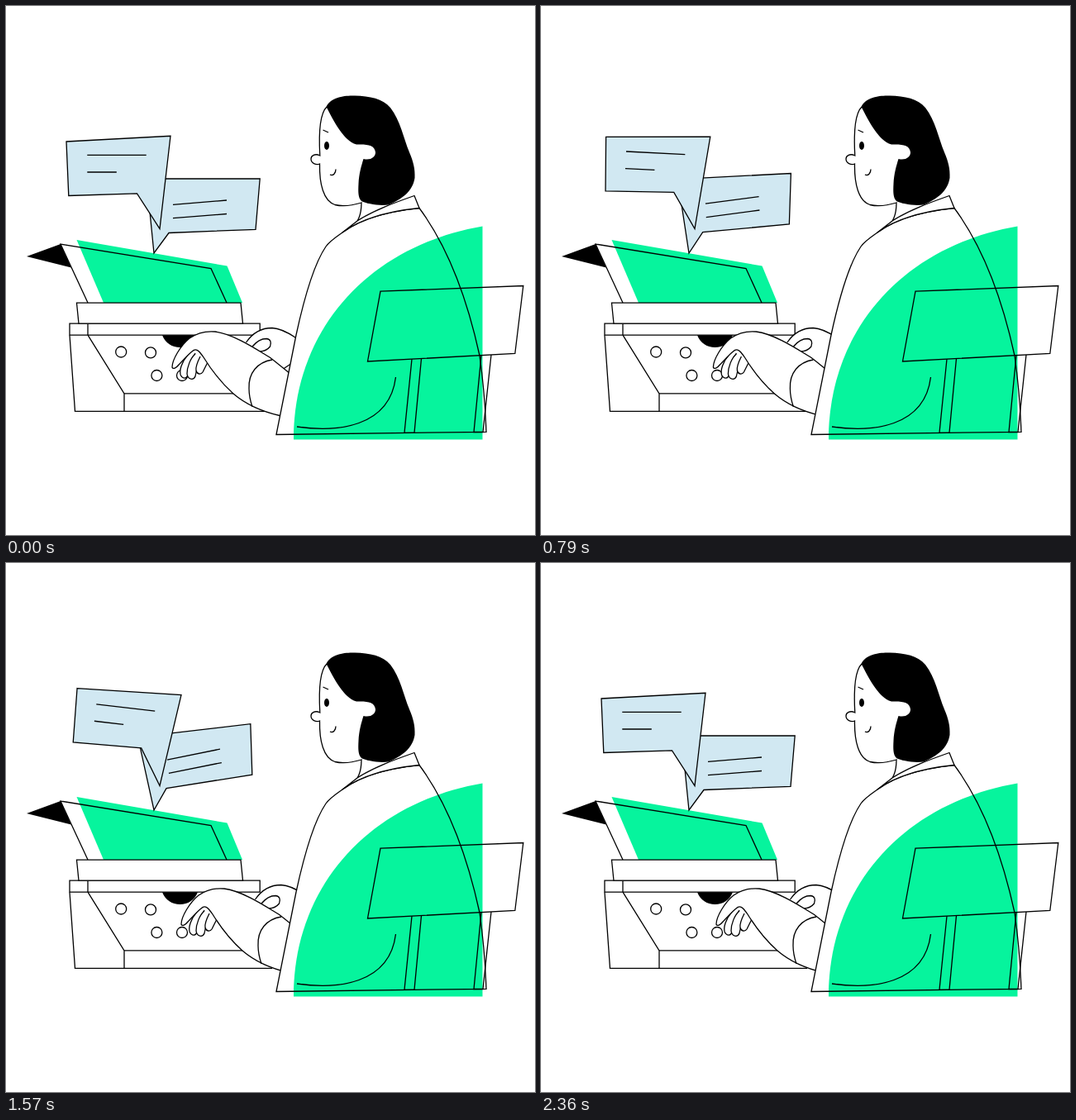
Animation of 640x640 px, one loop 2.43 s. Source, as an HTML page:

```html
<!DOCTYPE html>
<html lang="en">
<head>
<meta charset="utf-8">
<title>Typing woman</title>
<style>
  html, body { margin: 0; width: 100%; height: 100%; overflow: hidden; background: #fff; }
  svg { display: block; width: 100vw; height: 100vh; }
  .line { fill: none; stroke: #000; stroke-width: 1.3; }
  .white { fill: #fff; }
  .green { fill: #06f49d; stroke: none; }
  .blue { fill: #d1e8f2; }
  .solid { fill: #000; stroke: none; }
</style>
</head>
<body>
<svg viewBox="0 0 640 640">
  <g class="line" id="typewriter">
    <path d="M322 490.300H83.500L77 398.200"/>
    <path d="M99 398.200L143 469V490.300M143 468.800H300"/>
    <path d="M77 384.200H307.200V398.200H77ZM99 384.200V398.200"/>
    <path class="solid" d="M189 398.200C193 408 201 413 210.500 413S228 408 232 398.200Z"/>
    <circle cx="139.200" cy="418.500" r="6.500"/>
    <circle cx="175" cy="419.400" r="6.500"/>
    <circle cx="182.400" cy="447" r="6.500"/>
    <circle cx="213" cy="447" r="6.500"/>
    <path class="green" d="M85.500 283L267.500 314.500L286 359H118Z"/>
    <path d="M99 359L66 288L248 317.500L267 359"/>
    <path class="white" d="M85.500 359.200H284L286.500 384.200H88Z"/>
    <path class="solid" d="M25 303L66 288L79 316.500Z"/>
  </g>

  <g class="line" id="hands">
    <path class="white" d="M301.500 407C309 396 320 389.500 333 389.500C343 390 352 395 361 401L375 420L345 440L309 412"/>
    <path class="white" d="M309 412C314 406 320 402.500 326 402.500C331 403 332.500 407 330.500 412C327 416.500 323 418 317 418"/>
    <path class="white" d="M231 422C224 430 220 441 222.500 447C225 451.500 230 451 231 446C231 438 235 428 240 420"/>
    <path class="white" d="M240 421C234 426 230 437 230 445C231 452.500 238 453 240 448C241 442 243 435 247 429"/>
    <path class="white" d="M246 424C243 430 240 437 241 441C242 446 247 446 249 443C251 439 253 435 255 431"/>
    <path class="white" d="M212 437C212 428 222 411 233 402C243 395 253 393 264 394C287 397 315 416 330 425C338 431 345 437 356 446L366 500L342 495.500C318 490 300 481 286 469C268 453 258 438 250 425C248 422 247 421 245 418.500C242 415 239 415 236 418C230 423 224 430 220 434C217 438 213 440 212 437Z"/>
    <path d="M333 428C315 431 304 444 305 463C305 472 307 479 309 485"/>
  </g>

  <g class="line" id="person">
    <path class="white" stroke="none" d="M327 518.500L351 398L407 274L500 244.500L581 515.300Z"/>
    <path class="green" d="M348 524.500V516C352 384 445 289 576.500 266.500V524.500Z"/>
    <path d="M327 518.500L351 398C361 352 374 310 387 291C392 284 400 279 407 274C430 257 465 248 500 244.500C530 285 556 345 573 423C578 458 580 488 581 515.300Z"/>
    <path d="M352 509C400 516 464 510 471.500 449"/>
    <path class="white" d="M430 237C430 248 429 254 425 260L407 274C430 257 465 248 500 244.500L494 229.500C470 238 445 247 425 260"/>
    <path class="white" d="M388 122C380 130 378 150 379.800 181C374 178 369 181 369 185C369 190 375 193 379.500 191C379 215 384 236 398 240.500C408 243 420 241 430 238"/>
    <path class="solid" d="M387.500 122C393 110 410 108 422 108.500C440 109 456 112 465 123C477 138 481 160 488 177C493 189 495 197 494.500 208C492 225 478 234 463 240.500C450 242 436 239 430 236C426 232 426 225 426.500 215C427 203 430 193 432.500 185C441 187 447 183 447 177C446 168 437 167 424 167.500C408 163 396 138 387.500 122Z"/>
    <path d="M383.500 150L390 153M392 204C396 206 399 202 399 197.500"/>
    <ellipse id="eye" class="solid" cx="388" cy="169" rx="3" ry="5"/>
  </g>

  <g class="line" id="chair">
    <path d="M453 345.200L625.800 338.500L615.800 420.500L437.500 430Z"/>
    <path d="M491 427.200L482 516.300H494L502.500 426.600M575 422.800L566 515.500H577L587 422"/>
  </g>

  <g class="line" id="reply">
    <path class="blue" d="M170 209H307.200L302 270.300L197 274.500L179 299Z"/>
    <path d="M202 240.300L267 235M202 256.700L267 251.500"/>
  </g>
  <g class="line" id="message">
    <path class="blue" d="M73 164L199 157.300L186 269.500L158.500 226.800L75.800 229.500Z"/>
    <path d="M98.300 180.400H169.700M98.300 201H133.800"/>
  </g>
</svg>
<script>
const LOOP = 2430, STEPS = 34, STEP = LOOP / STEPS;
const $ = id => document.getElementById(id);

// [time in ms, value]
const SWAY = [[0, 0], [500, 1.05], [790, 3], [1000, 5.6], [1145, 8.2], [1290, 7.2],
  [1450, 6.75], [1710, 6.65], [1860, 6.2], [2030, 3.6], [2290, 0.25], [2360, 0], [LOOP, 0]];
const EYE = [[0, 5], [800, 5], [1000, 0.35], [1150, 0.35], [1290, 2.2], [1430, 5], [LOOP, 5]];
const REACH = [[0, -11], [1170, 0], [LOOP, 0]];

const segment = (keys, t) => Math.max(0, keys.findIndex(k => k[0] > t) - 1);

function linear(keys, t) {
  const i = segment(keys, t), [t0, a] = keys[i], [t1, b] = keys[i + 1];
  return a + (b - a) * (t - t0) / (t1 - t0);
}

// Cubic through the keys, flat at every turning point.
function smooth(keys, t) {
  const rate = i => (keys[i + 1][1] - keys[i][1]) / (keys[i + 1][0] - keys[i][0]);
  const slope = i => {
    if (i === 0 || i === keys.length - 1) return 0;
    const p = rate(i - 1), q = rate(i);
    return p * q > 0 ? 2 * p * q / (p + q) : 0;
  };
  const i = segment(keys, t), [t0, a] = keys[i], [t1, b] = keys[i + 1];
  const h = t1 - t0, u = (t - t0) / h, v = 1 - u;
  return v * v * (1 + 2 * u) * a + u * u * (3 - 2 * u) * b
    + h * u * v * (v * slope(i) - u * slope(i + 1));
}

function draw(time) {
  const t = Math.floor((time % LOOP + 2) / STEP) % STEPS * STEP;
  const angle = smooth(SWAY, t);
  $("message").setAttribute("transform", `rotate(${angle} 186 269.5)`);
  $("reply").setAttribute("transform", `rotate(${-angle} 179 299)`);
  $("hands").setAttribute("transform", `translate(${linear(REACH, t)} 0)`);
  $("eye").setAttribute("ry", linear(EYE, t));
}

const start = performance.now();
function tick() {
  draw(performance.now() - start);
  requestAnimationFrame(tick);
}
tick();
</script>
</body>
</html>
```
